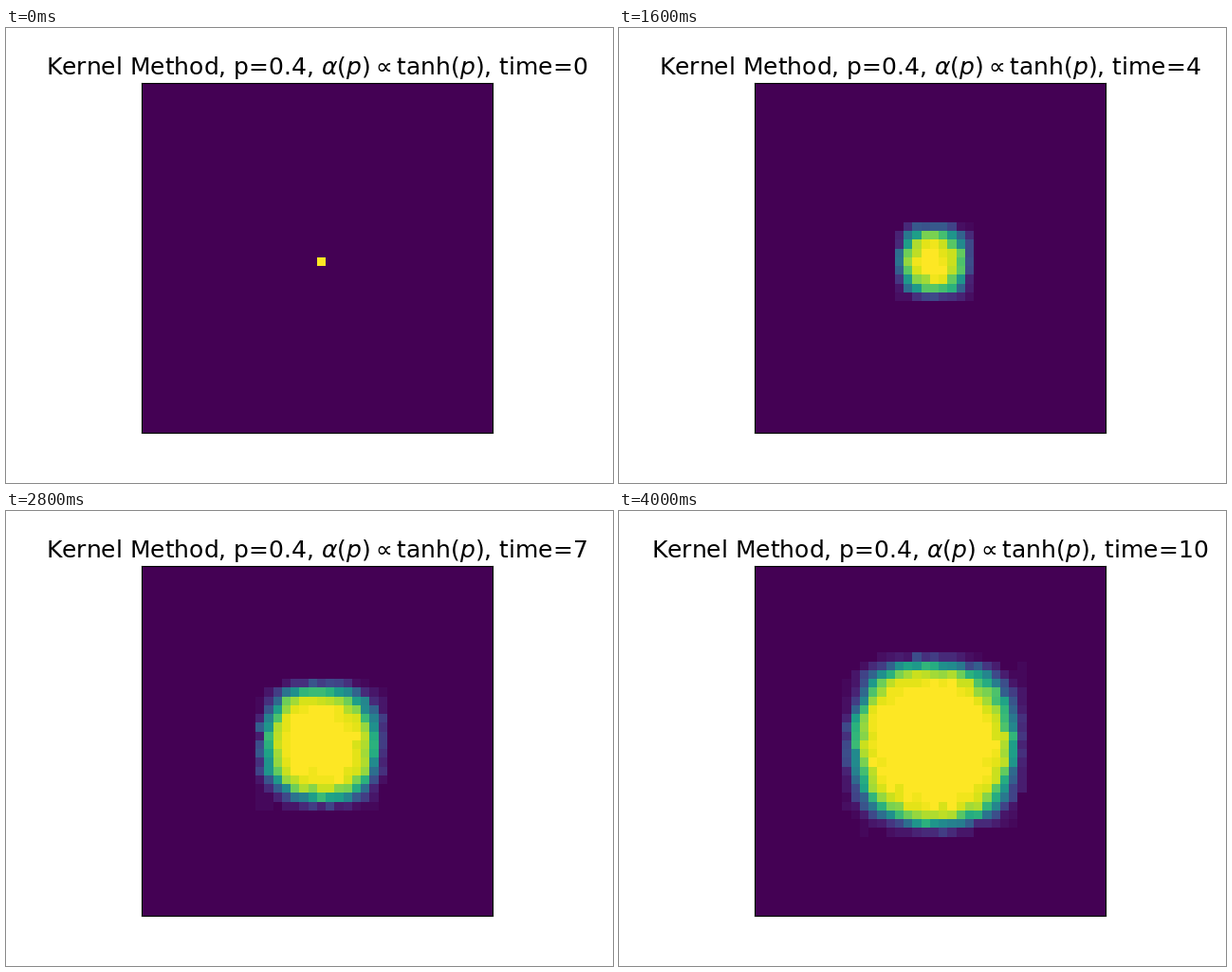
Write a matplotlib script that moves like this. It is 640 px wide and 480 px high and loops after 4.4 s.

```python
import numpy as np
import matplotlib.pyplot as plt
from matplotlib.animation import FuncAnimation

SIZE = 40
STEPS = 11
TRIALS = 50
P = 0.4
NEIGHBOURS = [(dy, dx) for dy in (-1, 0, 1) for dx in (-1, 0, 1) if (dy, dx) != (0, 0)]


def spread(infected, rng):
    """Each infected neighbour independently infects a cell with probability P."""
    count = sum(np.roll(infected, shift, axis=(1, 2)).astype(int) for shift in NEIGHBOURS)
    return infected | (rng.random(infected.shape) < 1 - (1 - P) ** count)


def simulate():
    """Mean infection map over all trials, one per time step."""
    rng = np.random.default_rng(7)
    infected = np.zeros((TRIALS, SIZE, SIZE), dtype=bool)
    infected[:, SIZE // 2, SIZE // 2] = True
    maps = [infected.mean(axis=0)]
    for _ in range(STEPS - 1):
        infected = spread(infected, rng)
        maps.append(infected.mean(axis=0))
    return maps


maps = simulate()

plt.rcParams["font.family"] = "DejaVu Sans"
fig, ax = plt.subplots(figsize=(6.4, 4.8), dpi=100)
image = ax.imshow(maps[0], cmap="viridis", vmin=0, vmax=1)
ax.set_xticks([])
ax.set_yticks([])
title = ax.set_title("", fontsize=18)


def update(step):
    image.set_data(maps[step])
    title.set_text(rf"Kernel Method, p={P}, $\alpha(p) \propto \tanh(p)$, time={step}")
    return image, title


anim = FuncAnimation(fig, update, frames=STEPS, interval=400, repeat=True, repeat_delay=0)
plt.show()
```
